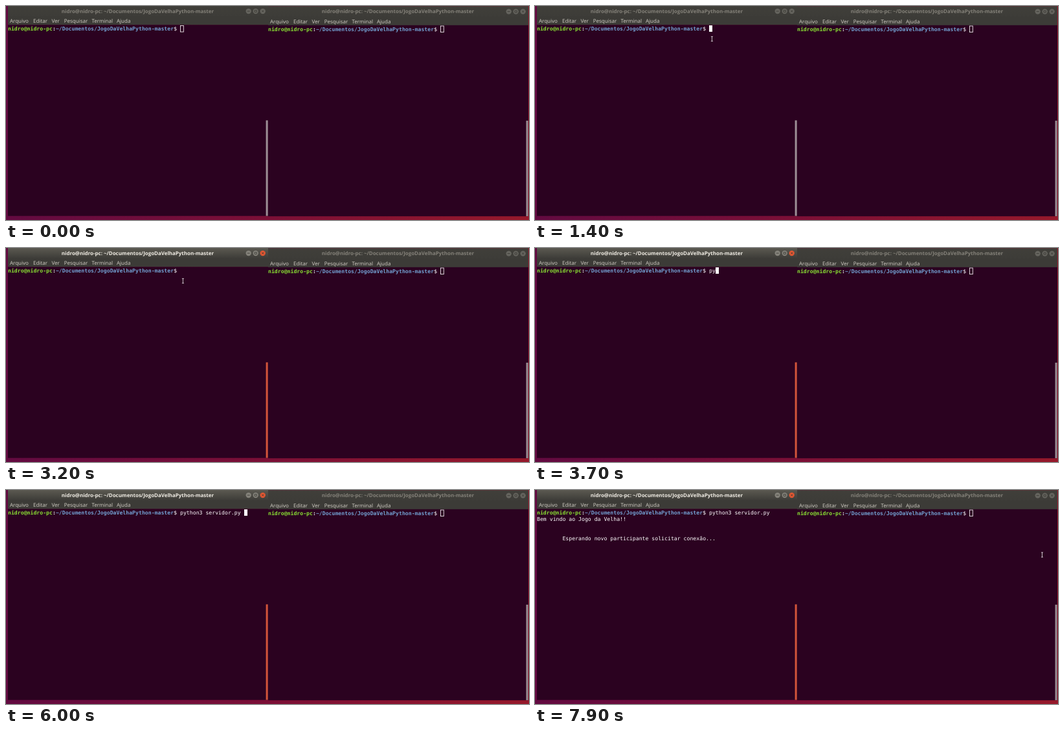
Animation of 808x332 px, one loop 8000 ms. Source, as an HTML page with a canvas:

```html
<!DOCTYPE html>
<html lang="pt">
<head>
<meta charset="utf-8">
<title>Jogo da Velha</title>
<style>
  html, body { margin: 0; width: 100%; height: 100%; overflow: hidden; background: #2b0220; }
  canvas { display: block; width: 808px; height: 332px; }
</style>
</head>
<body>
<canvas id="stage" width="808" height="332"></canvas>
<script>
const ctx = document.getElementById('stage').getContext('2d');
ctx.textRendering = 'geometricPrecision';

const LOOP = 8000, STEP = 100, BLINK = 600;
const CELL = 4.926, LINE = 9.83, LEFT = 3, TOP = 30.6;
const FOCUS = 1400, ENTER = 6000, OUTPUT = 6300;
const HOST = 'nidro@nidro-pc';
const PATH = '~/Documentos/JogoDaVelhaPython-master';
const PROMPT_LEN = HOST.length + PATH.length + 3;
const MENU = [['Arquivo', 6], ['Editar', 42], ['Ver', 70.5], ['Pesquisar', 89.7], ['Terminal', 132.5], ['Ajuda', 171]];
const COMMAND = 'python3 servidor.py ';
// time of each key press and the number of characters then on the line
const KEYS = [[3400, 1], [3500, 2], [4000, 4], [4200, 5], [4300, 6], [4500, 7], [4900, 8], [5300, 9], [5600, 20], [ENTER, 20]];

const clamp = v => Math.max(0, Math.min(1, v));
const mix = (a, b, k) => a + (b - a) * k;
const rgb = (a, b, k) => `rgb(${a.map((v, i) => Math.round(mix(v, b[i], k))).join(',')})`;

function rect(x, y, w, h, color) {
  ctx.fillStyle = color;
  ctx.fillRect(x, y, w, h);
}

function gradient(x0, y0, x1, y1, ...colors) {
  const g = ctx.createLinearGradient(x0, y0, x1, y1);
  colors.forEach((c, i) => g.addColorStop(i / (colors.length - 1), c));
  return g;
}

function label(text, x, y, font, color, align = 'left') {
  ctx.font = font;
  ctx.fillStyle = color;
  ctx.textAlign = align;
  ctx.fillText(text, x, y);
}

// Terminal text sits on a fixed character grid
function mono(text, col, row, color, weight = 'normal') {
  const font = `${weight} 8.18px "DejaVu Sans Mono", monospace`;
  [...text].forEach((ch, i) => {
    if (ch !== ' ') label(ch, LEFT + (col + i) * CELL, TOP + row * LINE + 7.6, font, color);
  });
}

function cursor(col, row, filled) {
  const x = Math.round(LEFT + col * CELL), y = TOP + row * LINE - 0.6;
  if (filled) return rect(x, y, 5, 10, '#fff');
  ctx.strokeStyle = '#eeeaec';
  ctx.lineWidth = 0.9;
  ctx.strokeRect(x + 0.5, y + 0.5, 4.8, 9.6);
}

function button(x, kind, focus) {
  const y = 8.1;
  const close = kind === 'close';
  ctx.fillStyle = rgb([101, 100, 94], close ? [226, 87, 50] : [132, 130, 122], focus);
  ctx.beginPath();
  ctx.arc(x, y, 4.2, 0, Math.PI * 2);
  ctx.fill();
  ctx.strokeStyle = '#383732';
  ctx.lineWidth = 0.8;
  ctx.beginPath();
  if (kind === 'min') {
    ctx.moveTo(x - 2, y);
    ctx.lineTo(x + 2, y);
  } else if (kind === 'max') {
    ctx.rect(x - 1.6, y - 1.5, 3.2, 3);
  } else {
    ctx.moveTo(x - 1.5, y - 1.5);
    ctx.lineTo(x + 1.5, y + 1.5);
    ctx.moveTo(x + 1.5, y - 1.5);
    ctx.lineTo(x - 1.5, y + 1.5);
  }
  ctx.stroke();
}

function terminal(focus, content) {
  rect(3, 0, 402, 29.5, '#3c3b37');
  rect(3, 0, 402, 16, gradient(0, 0, 0, 16, rgb([64, 63, 58], [91, 89, 81], focus), '#3d3c38'));
  rect(3, 29.3, 402, 296.4, '#2b0220');
  label(`${HOST}: ${PATH}`, 203.4, 10.9, 'bold 7.95px "Open Sans", sans-serif',
    rgb([132, 129, 121], [240, 236, 228], focus), 'center');
  button(374.7, 'min', focus);
  button(385.7, 'max', focus);
  button(396.7, 'close', focus);
  MENU.forEach(([text, x]) => label(text, x, 26.3, '8px "Open Sans", sans-serif', '#d5d1c8'));
  rect(401.6, 177.4, 3, 148.2, rgb([157, 144, 150], [211, 85, 58], focus));
  mono(HOST, 0, 0, '#8ae234', 'bold');
  mono(':', HOST.length, 0, '#fff', 'bold');
  mono(PATH, HOST.length + 1, 0, '#729fcf', 'bold');
  mono('$', PROMPT_LEN - 2, 0, '#fff');
  content();
}

function session(t) {
  const pressed = KEYS.filter(([at]) => at <= t).pop() || [FOCUS, 0];
  const [since, count] = pressed;
  mono(COMMAND.slice(0, count), PROMPT_LEN, 0, '#fff');
  if (t >= OUTPUT) {
    mono('Bem vindo ao Jogo da Velha!!', 0, 1, '#fff');
    mono('Esperando novo participante solicitar conexão...', 8, 4, '#fff');
  }
  if (t < FOCUS) return cursor(PROMPT_LEN, 0, false);
  if (Math.floor((t - since) / BLINK) % 2) return;
  if (t >= OUTPUT) cursor(0, 5, true);
  else if (t > ENTER) cursor(0, 1, true);
  else cursor(PROMPT_LEN + count, 0, true);
}

function beam(x, y) {
  ctx.strokeStyle = '#d8d2d6';
  ctx.lineWidth = 0.9;
  ctx.beginPath();
  ctx.moveTo(x - 1.5, y - 3.6);
  ctx.lineTo(x + 1.5, y - 3.6);
  ctx.moveTo(x, y - 3.6);
  ctx.lineTo(x, y + 3.6);
  ctx.moveTo(x - 1.5, y + 3.6);
  ctx.lineTo(x + 1.5, y + 3.6);
  ctx.stroke();
}

function pointer(t) {
  if (t >= 1000 && t < 3400) {
    const k = 1 - (1 - clamp((t - 900) / 400)) ** 2;
    beam(mix(400, 273.4, k), mix(240, 51, k));
  } else if (t >= 7200) {
    const k = clamp((t - 7100) / 700);
    const e = k * k * (3 - 2 * k);
    beam(mix(273.4, 783.5, e), mix(51, 100.5, e));
  }
}

function draw(t) {
  rect(0, 0, 808, 332, gradient(0, 0, 808, 0, '#620a40', '#7b0f36', '#96192b'));
  ctx.save();
  ctx.translate(402, 0.5);
  terminal(0, () => cursor(PROMPT_LEN, 0, false));
  ctx.restore();
  terminal(clamp((t - FOCUS) / 400), () => session(t));
  pointer(t);
}

function tick() {
  draw(Math.floor(performance.now() % LOOP / STEP) * STEP);
  requestAnimationFrame(tick);
}
tick();
</script>
</body>
</html>
```
